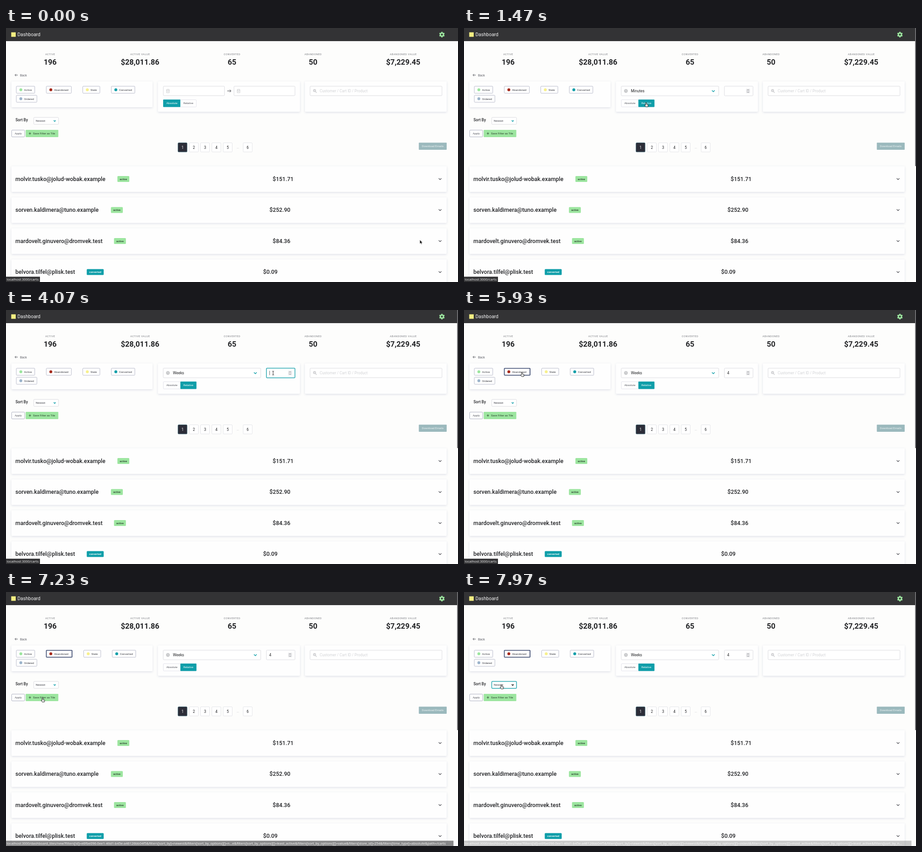
These frames come from a looping animation (998x561 px, 8 s). An HTML page:

```html
<!DOCTYPE html>
<html lang="en">
<head>
<meta charset="utf-8">
<title>Dashboard</title>
<style>
  html, body { margin: 0; width: 100%; height: 100%; overflow: hidden; background: #fdfdfc; }
  svg { display: block; width: 998px; height: 561px; font-family: Roboto, sans-serif; }
  text { white-space: pre; }
</style>
</head>
<body>
<svg id="stage" viewBox="0 0 998 561"></svg>
<script>
const LOOP = 8000;
const TEAL = '#0f9ea9', GREEN = '#9ce59f', INK = '#222326', GREY = '#c9cacc';
const stage = document.getElementById('stage');

// Markup helpers
const rect = (x, y, w, h, fill, more = '') =>
  `<rect x="${x}" y="${y}" width="${w}" height="${h}" fill="${fill}" ${more}/>`;
const box = (x, y, w, h, stroke = '#d3d4da', sw = 0.8, fill = '#fff') =>
  rect(x, y, w, h, fill, `rx="1.5" stroke="${stroke}" stroke-width="${sw}"`);
const field = (id, x, y, w, h) => rect(x, y, w, h, '#fff', `id="${id}" rx="1.5"`);
const text = (x, y, size, str, fill = INK, more = '') =>
  `<text x="${x}" y="${y}" font-size="${size}" fill="${fill}" ${more}>${str.replace(/&/g, '&amp;')}</text>`;
const mid = (x, y, size, str, fill, more = '') =>
  text(x, y, size, str, fill, `text-anchor="middle" ${more}`);
const line = (d, stroke, sw = 1, more = '') =>
  `<path d="${d}" fill="none" stroke="${stroke}" stroke-width="${sw}" ${more}/>`;
const dot = (x, y, r, fill) => `<circle cx="${x}" cy="${y}" r="${r}" fill="${fill}"/>`;
const group = (id, body) => `<g id="${id}">${body}</g>`;
const card = (x, y, w, h) => rect(x, y, w, h, '#fefefe', 'rx="2" filter="url(#shadow)"');
const chevron = (x, y, r, id = '') =>
  line(`M${x - r} ${y - r / 2}l${r} ${r}l${r} ${-r}`, TEAL, 1.5, id && `id="${id}"`);

function gear(x, y) {
  let teeth = '';
  for (let a = 0; a < 360; a += 60)
    teeth += rect(x - 1.7, y - 6.2, 3.4, 4, GREEN, `rx=".7" transform="rotate(${a} ${x} ${y})"`);
  return teeth + dot(x, y, 4.7, GREEN) + dot(x, y, 2, '#333335');
}

function header() {
  return rect(0, 0, 998, 29, '#333335') + rect(11.5, 9.5, 10, 10, '#f3ee82') +
    text(25.2, 18.4, 10.5, 'Dashboard', '#f4f4f4') + gear(962.5, 14.6);
}

function stats() {
  const items = [
    [97.5, 'ACTIVE', '196'], [296, 'ACTIVE VALUE', '$28,011.86'], [499, 'CONVERTED', '65'],
    [678, 'ABANDONED', '50'], [877, 'ABANDONED VALUE', '$7,229.45']
  ];
  return items.map(([x, label, value]) =>
    mid(x + 0.2, 60.3, 5.7, label, '#77797f', 'letter-spacing=".5"') +
    mid(x, 80.6, 16.6, value, INK, 'font-weight="700"')).join('');
}

const chip = (x, y, w, label, color) =>
  box(x, y, w, 15.5, '#b0b3c4', 0.9) + dot(x + 10, y + 7.8, 3.2, color) +
  text(x + 17, y + 10, 6.24, label, '#3a3b42');

function statusCard() {
  return card(12, 118, 311.5, 57) +
    chip(22.8, 128.6, 40.7, 'Active', GREEN) +
    chip(89, 128.6, 55.3, 'Abandoned', '#a52a1c') +
    group('picked', rect(89, 128.8, 57, 15.2, 'none', 'rx="1" stroke="#3a486f" stroke-width="1.5"')) +
    group('later', chip(169.5, 128.6, 37.7, 'Stale', '#f7f08c') +
      chip(232.5, 128.6, 52, 'Converted', TEAL)) +
    chip(22.8, 148.5, 45.4, 'Ordered', '#9db4cb');
}

const calendar = x =>
  line(`M${x - 3} 136h6v7h-6zM${x - 3} 138.3h6M${x - 1.5} 136v-1.5M${x + 1.5} 136v-1.5M${x - 1.5} 140.6h3`, GREY, 0.9);

function modeButtons(active) {
  const at = active ? 385 : 347, w = active ? 35.5 : 38;
  const ink = on => on ? '#fff' : '#55575f';
  return box(347.4, 158.4, 72.7, 15.9, '#d8d9e2', 0.7) + rect(at, 158, w, 16.6, TEAL, 'rx="1"') +
    mid(366.2, 168.4, 6.24, 'Absolute', ink(!active)) + mid(402.6, 168.4, 6.24, 'Relative', ink(active));
}

function timeCard() {
  const absolute = box(347.4, 128.6, 135, 20.8) + box(503.4, 128.6, 134.6, 20.8) +
    calendar(357.5) + calendar(513.5) +
    line('M488.5 139h8M493.8 136l3 3l-3 3', '#3f4046', 1) + modeButtons(0);
  const relative = field('unitBox', 347.2, 128.5, 215.2, 21.2) +
    dot(357.5, 139, 4.2, GREY) + line('M357.5 136.6v2.6l1.5 1', '#f2f2f2', 0.7) +
    text(368.6, 142, 8.32, '', INK, 'id="unit"') + chevron(550.5, 139.3, 3, 'unitArrow') +
    field('countBox', 575, 128.5, 63, 21.2) +
    text(581, 142, 8.32, '', INK, 'id="count"') +
    rect(623, 134.3, 8.4, 9.8, '#e6e6e8', 'rx="1"') +
    line('M625.4 137.8l1.8-1.8l1.8 1.8M625.4 140.8l1.8 1.8l1.8-1.8', '#77797f', 0.9) +
    group('caret', line('M582 134.3v9.6', '#222', 0.7)) + modeButtons(1);
  return card(335.5, 118, 313.5, 67) + group('absolute', absolute) + group('relative', relative);
}

function searchCard() {
  return card(660, 118, 313, 67) + box(671.4, 128.6, 291.2, 20.8) +
    `<circle cx="681.3" cy="138.2" r="2.6" fill="#e4e4e6" stroke="${GREY}" stroke-width="1.1"/>` +
    line('M683.2 140.2l2.6 2.7', GREY, 1.4) +
    text(692.8, 142, 8.32, 'Customer / Cart ID / Product', '#d2d3d6');
}

function toolbar() {
  let out = line('M26 104h-6.3M22.3 101.4l-2.6 2.6l2.6 2.6', '#44464c', 0.9) +
    text(31, 106.5, 6.76, 'Back', '#5c5e66') +
    text(21, 206.3, 8.4, 'Sort By', INK, 'font-weight="500"') +
    field('sortBox', 61.3, 197.4, 54.6, 15.4) +
    text(65.7, 207.3, 6.24, 'Newest', '#3a3b42') + chevron(107.5, 205.2, 2.2, 'sortArrow') +
    box(12.6, 225.5, 28.6, 15, '#9a9eb3', 0.8) + mid(27, 235.3, 6.24, 'Apply', '#55575f') +
    rect(43.5, 225, 72, 16, GREEN, 'rx="1.2"') +
    line('M50.3 233h5M52.8 230.5v5', '#2d4030', 0.9) +
    text(59.8, 235.3, 6.24, 'Save Filter as Tile', '#2d4030') +
    rect(911.5, 253.3, 61.5, 15.7, '#9bb9bd', 'rx="1"') +
    mid(942.3, 263.4, 6.24, 'Download Emails', '#eef4f4');
  [[389.8, 1], [414.8, 2], [439.5, 3], [464.5, 4], [489.5, 5], [533.7, 6]].forEach(([x, n]) => {
    const on = n === 1;
    out += box(x - 10, 253.6, 20, 20.2, on ? '#2f5f6e' : '#dcdde3', 0.8, on ? '#2c2d38' : '#fff') +
      mid(x, 266.8, 8.32, String(n), on ? '#fff' : INK);
  });
  return out + mid(512, 266, 7, '...', '#a9abb2');
}

function carts() {
  const rows = [
    ['molvir.tusko@jolud-wobak.example', 'active', 246, '$151.71', 588.8],
    ['sorven.kaldimera@tuno.example', 'active', 231.7, '$252.90', 581.8],
    ['mardovelt.ginuvero@dromvek.test', 'active', 238.5, '$84.36', 588.8],
    ['belvora.tilfel@plisk.test', 'converted', 178.3, '$0.09', 567.8]
  ];
  return rows.map(([mail, state, bx, price, px], i) => {
    const y = 333.4 + i * 68.5, on = state === 'active', w = on ? 26.2 : 37.4;
    return card(12, y - 28, 961, 56.5) +
      text(20.8, y + 4.3, 12.48, mail, INK, 'font-weight="500"') +
      rect(bx, y - 6.4, w, 12.9, on ? GREEN : TEAL, 'rx="1.5"') +
      mid(bx + w / 2, y + 2.1, 6, state, on ? '#26382a' : '#fff', 'font-weight="500"') +
      text(px, y + 4.3, 12.48, price, INK, 'font-weight="500"') +
      line(`M955.4 ${y - 1.5}l3 3l3-3`, '#3a3b42', 1.1);
  }).join('');
}

const pointers = {
  arrow: '<path d="M0 0V8.6L2 6.8L3.4 9.8L4.8 9.1L3.5 6.3H6.1Z" fill="#111" stroke="#fff" stroke-width=".6"/>',
  hand: '<path d="M-1 0Q0-.9 1 0V3.4L4 4Q5 4.4 4.8 5.6L4 9H-.7L-3.2 5.6Q-3 4.4-1 5.6Z" fill="#fff" stroke="#111" stroke-width=".9"/>' +
    line('M1.8 5v1.6M3.2 5.2v1.6', '#111', 0.5),
  beam: line('M-1.8-4.3Q0-4.3 0-3.4Q0-4.3 1.8-4.3M0-3.6V3.6M-1.8 4.3Q0 4.3 0 3.4Q0 4.3 1.8 4.3', '#111', 0.9)
};

stage.innerHTML = `<defs><filter id="shadow" x="-5%" y="-30%" width="110%" height="170%">
    <feDropShadow dx="0" dy="1.5" stdDeviation="2.1" flood-color="#4a4f86" flood-opacity=".18"/>
  </filter></defs>` +
  rect(0, 0, 998, 561, '#fdfdfc') + header() + stats() + statusCard() + timeCard() + searchCard() +
  toolbar() + carts() +
  group('scroll', rect(996, 0, 2, 305, '#6c6c70')) +
  group('status', rect(0, 549.3, 75, 11.7, '#333335', 'id="statusBox"') +
    text(1.8, 558, 7.45, '', '#e9e9e9', 'id="link" style="font-family:\'Noto Sans\',sans-serif"')) +
  group('pointer', Object.entries(pointers).map(([k, v]) => group(k, v)).join(''));

const el = {};
stage.querySelectorAll('[id]').forEach(n => el[n.id] = n);
const show = (name, on) => el[name].style.display = on ? '' : 'none';
const put = (name, str) => { if (el[name].textContent !== str) el[name].textContent = str; };
const focus = (name, on) => {
  el[name].setAttribute('stroke', on ? '#27a6b0' : '#d3d4da');
  el[name].setAttribute('stroke-width', on ? 1.5 : 0.8);
};

// Status bar addresses
const host = 'localhost:3000/';
const opt = v => '&filters[sort_by_options][]=' + v;
const base = host + 'dashboard_tiles/new?filters[id]=e6fbe096-0ee1-46d1-b45e-a46126bb04f5&filters[sort_by]=newest';
const folded = base + opt('n…e') + opt('least_active') + opt('value') +
  '&filters[store_id]=254&filters[time_type]=absolute&path=/carts';
const cut = base + ['newest', 'oldest', 'most_active', 'least_active'].map(opt).join('') + '&filters[sort_by_n…';

// Pointer stops: time, x, y
const stops = [
  [0, 913.7, 468], [60, 913.7, 468], [770, 361.7, 118], [900, 364, 120], [1250, 402, 165], [1520, 402, 165],
  [1850, 415, 140], [2100, 415, 140], [2480, 389.5, 193], [2900, 389.5, 193], [3050, 396, 188],
  [3700, 589.8, 139.3], [4900, 589.8, 139.3], [5600, 128, 138], [6000, 128, 138], [6450, 80.7, 234],
  [6600, 78, 238], [6800, 84, 247], [7000, 84, 247], [7130, 80.7, 234], [7550, 80.7, 234],
  [7800, 82.7, 205], [8000, 82.7, 205]
];
const hotspots = [
  [347, 158, 73, 17], [347, 128, 216, 22], [23, 128, 41, 16], [89, 128, 57, 16], [170, 128, 38, 16],
  [233, 128, 53, 16], [61, 197, 55, 16], [43, 225, 73, 16]
];
const inside = (x, y, [l, t, w, h]) => x >= l && x <= l + w && y >= t && y <= t + h;
const ramp = (t, a, b) => Math.min(1, Math.max(0, (t - a) / (b - a)));

function pointerAt(t) {
  const i = Math.max(1, stops.findIndex(s => s[0] > t));
  const [t0, x0, y0] = stops[i - 1], [t1, x1, y1] = stops[i];
  const p = ramp(t, t0, t1), k = p * p * (3 - 2 * p);
  return [x0 + (x1 - x0) * k, y0 + (y1 - y0) * k];
}

function render(t) {
  const relative = t >= 1400, open = t >= 1980 && t < 3000;
  const typing = t >= 3800 && t < 5700, picked = t >= 5750;

  show('scroll', t >= 30);
  show('absolute', !relative);
  show('relative', relative);
  put('unit', t < 3000 ? 'Minutes' : 'Weeks');
  focus('unitBox', t >= 1980 && t < 3800);
  el.unitArrow.setAttribute('stroke', open ? '#111' : TEAL);
  focus('countBox', typing);
  put('count', t >= 4450 ? '4' : '');
  show('caret', typing && t < 4450 && (t - 3800) % 1000 < 500);

  show('picked', picked);
  el.later.setAttribute('transform', `translate(${picked ? 2 : 0} 0)`);
  focus('sortBox', t >= 7880);
  el.sortArrow.setAttribute('stroke', t >= 7880 ? '#111' : TEAL);

  const long = t >= 6480;
  put('link', !long ? host + 'carts' : t < 7600 ? folded : cut);
  el.statusBox.setAttribute('width', long ? 988 : 75);
  el.status.setAttribute('opacity',
    1 - ramp(t, 6780, 7030) + ramp(t, 7160, 7285) - ramp(t, 7780, 8035));

  const [x, y] = pointerAt(t);
  const beam = inside(x, y, [575, 128, 47, 22]);
  const hand = !open && hotspots.some(h => inside(x, y, h));
  show('beam', beam);
  show('hand', hand && !beam);
  show('arrow', !hand && !beam);
  el.pointer.setAttribute('transform', `translate(${x} ${y})`);
}

const start = performance.now();
function tick() {
  render((performance.now() - start) % LOOP);
  requestAnimationFrame(tick);
}
render(0);
requestAnimationFrame(tick);
</script>
</body>
</html>
```
